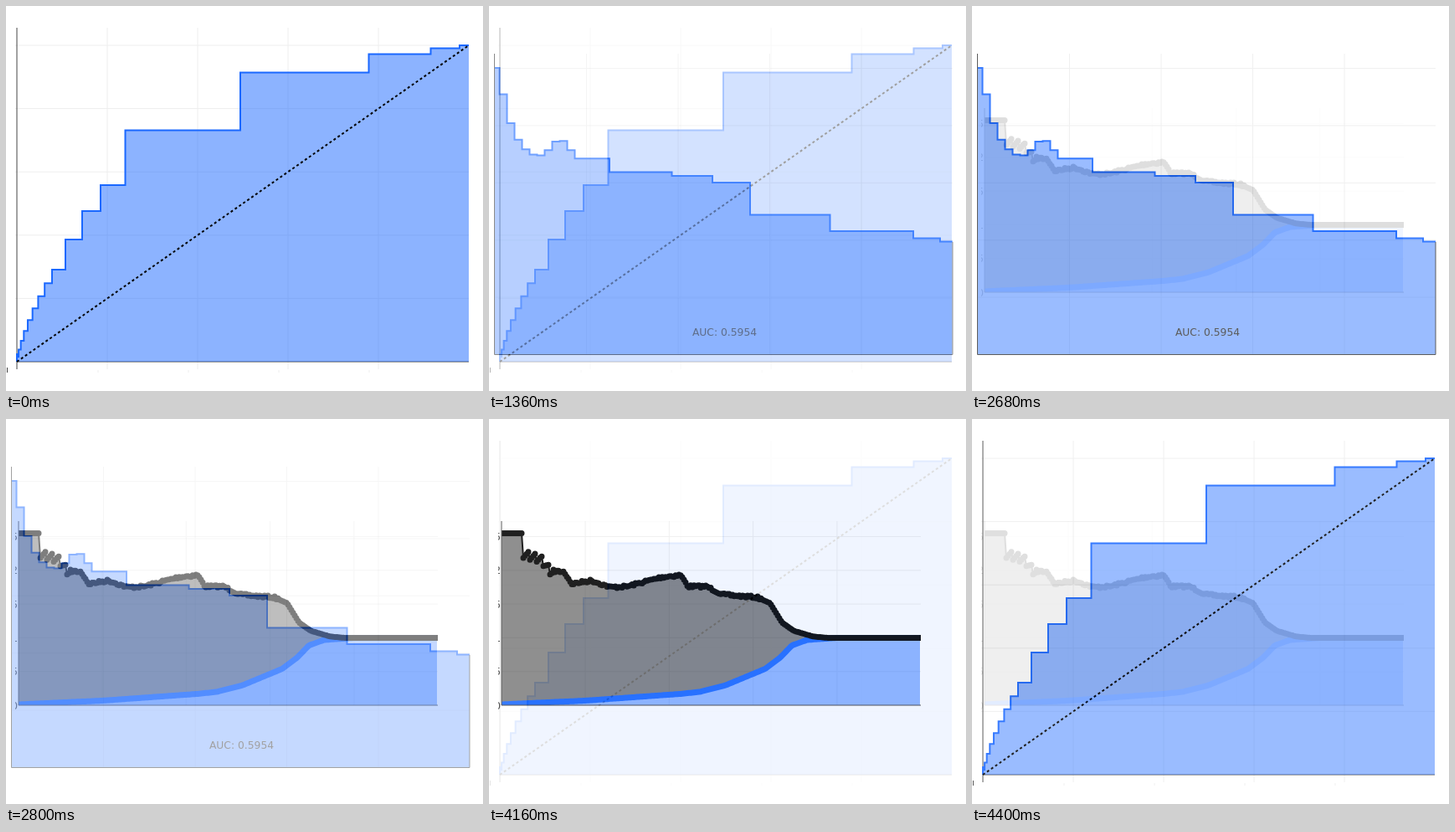
These frames come from a looping animation (570 by 460 pixels, 4.44 s). An HTML page:

```html
<!DOCTYPE html>
<html lang="en">
<head>
<meta charset="utf-8">
<title>Model curves</title>
<style>
  html, body { margin: 0; width: 570px; height: 460px; overflow: hidden; background: #fff; }
  svg { display: block; }
  path { fill: none; }
  .grid { stroke: #eee; }
  .axis { stroke: #444; }
  .line { stroke: #1a68ff; stroke-width: 2; }
  .area { fill: #1a68ff; fill-opacity: .5; }
  .gap { fill: #000; fill-opacity: .5; }
  .link { stroke: #000; stroke-width: 2; }
  .dots { stroke: #000; stroke-width: 7; stroke-linecap: round; }
  .thick { stroke: #1a68ff; stroke-width: 7; }
  .diagonal { stroke: #000; stroke-width: 2; stroke-dasharray: 3 3; }
  text { font: 12.3px Verdana, "DejaVu Sans", sans-serif; fill: #444; }
</style>
</head>
<body>
<svg width="570" height="460" viewBox="0 0 570 460">
  <clipPath id="plot"><rect x="15" y="122" width="501" height="220"/></clipPath>
  <clipPath id="labels"><rect x="11" y="122" width="4" height="230"/></clipPath>
  <g id="gain"></g>
  <g id="steps"></g>
  <g id="density"></g>
  <use id="again" href="#gain"/>
</svg>
<script>
const $ = id => document.getElementById(id);
const path = (cls, d) => `<path class="${cls}" d="${d}"/>`;
const paper = '<rect width="570" height="460" fill="#fff"/>';
const series = (n, f) => Array.from({ length: n }, (_, k) => f(k));
const pairs = text => text.split(' ').map(p => p.split(',').map(Number));

// Evenly spaced lines: first position and gap for each direction
const grid = (x, dx, nx, y, dy, ny, [left, top, right, bottom]) => path('grid',
  series(nx, k => `M${x + dx * k} ${top}V${bottom}`).join('') +
  series(ny, k => `M${left} ${y + dy * k}H${right}`).join(''));

// Each point is where a level ends and the level that follows
const stairs = (start, points) => start + points.map(([x, y]) => `H${x}V${y}`).join('');

function drawGain() {
  const early = series(9, k => {
    const s = (k + 1) / 9;
    return [13 + 42 * s ** 2, 425 - 110 * s ** 1.35];
  });
  const late = pairs('71,279 91,245 113,214 142.5,148.5 280,79.5 433.5,57.5 507.5,50.5 542,47');
  const curve = stairs('M13 425V416', [...early, ...late]) + 'H553';
  return paper +
    grid(121, 108, 4, 47, 75.6, 5, [11, 26, 553, 434]) +
    path('grid', series(4, k => `M${110 + 108 * k} 435v3`).join('')) +
    path('axis', 'M13 425H553') +
    path('area', curve + 'V425Z') +
    path('axis', 'M13 26V434M1.5 432v6') +
    path('line', curve) +
    path('diagonal', 'M13 425L553 47');
}

function drawSteps() {
  // A decaying fall with one bump, then a few wide steps
  const early = series(11, k => [
    12.5 + 9 * k,
    187 - 81.5 * Math.exp(-.55 * k) - 26 * Math.exp(-(((k - 7.6) / 1.8) ** 2))
  ]);
  const late = pairs('144,198.5 218.5,203 267,211 312,249.5 407.5,269 507,277.5 539,281.5');
  const curve = stairs('M7 74', [...early, ...late]) + 'H554';
  return paper +
    grid(116.5, 109.5, 4, 74.5, 68.4, 5, [7, 57, 554, 416]) +
    path('area', curve + 'V416.5H7Z') +
    path('line', curve) +
    path('axis', 'M6.5 57V416.5H554V282') +
    '<text x="281.5" y="393.5" text-anchor="middle">AUC: 0.5954</text>';
}

function interpolate(points, x) {
  const i = Math.max(1, points.findIndex(p => p[0] >= x));
  const [[x0, y0], [x1, y1]] = [points[i - 1], points[i]];
  return y0 + (y1 - y0) * (x - x0) / (x1 - x0);
}

function drawDensity() {
  const upperKeys = pairs('15,136.5 40,136.5 41,160 62,166 74,181 90,183 99,197 122,193 145,201 ' +
    '165,200 206,189 229,186.5 238,200 260,200 280,210 320,213 336,220 350,243 364,253 388,260 ' +
    '405,261.5 516,261.5');
  const lowerKeys = pairs('15,341 115,336.5 228,328.5 252,326 283,318 330,298.5 348,285 362,270.5 ' +
    '380,264 416,261.5 516,261.5');
  let seed = 7;
  const random = () => (seed = seed * 16807 % 2147483647) / 2147483647;
  // Sawtooth at first, then small noise, then smooth
  const wobble = x => {
    if (x < 41 || x > 325) return 0;
    return x < 77 ? 6 - 12 * ((x - 41) % 8) / 8 : 3 * random() - 1.5;
  };
  const sample = f => series(251, k => [15 + 2 * k, f(15 + 2 * k)]);
  const upper = sample(x => interpolate(upperKeys, x) + wobble(x));
  const lower = sample(x => interpolate(lowerKeys, x));
  const poly = points => points.join('L');
  const labels = ['2.5', '2', '1.5', '1', '0.5', '0'].map((label, k) =>
    `<text x="14" y="${145 + k * 40.3}" text-anchor="end">${label}</text>`).join('');
  return paper +
    grid(115, 100.3, 4, 140.5, 40.3, 5, [15, 122, 516, 342]) +
    `<g clip-path="url(#labels)">${labels}</g>
    <g clip-path="url(#plot)">` +
    path('area', `M15 342L${poly(lower)}V342Z`) +
    path('gap', `M${poly(upper)}L${poly([...lower].reverse())}Z`) +
    path('thick', `M${poly(lower)}`) +
    path('link', `M${poly(upper)}`) +
    path('dots', upper.map(p => `M${p}h0`).join('')) +
    '</g>' + path('axis', 'M15 122V342H516');
}

$('gain').innerHTML = drawGain();
$('steps').innerHTML = drawSteps();
$('density').innerHTML = drawDensity();

// Each fade rises by an eighth every 40 ms
const fades = [['steps', 1200], ['density', 2680], ['again', 4160]];
const begin = performance.now();
function draw() {
  const t = Math.max(0, performance.now() - begin) % 4440;
  for (const [id, start] of fades) {
    const step = Math.floor((t - start) / 40) + 1;
    $(id).setAttribute('opacity', Math.min(1, Math.max(0, step / 8)));
  }
  requestAnimationFrame(draw);
}
draw();
</script>
</body>
</html>
```
